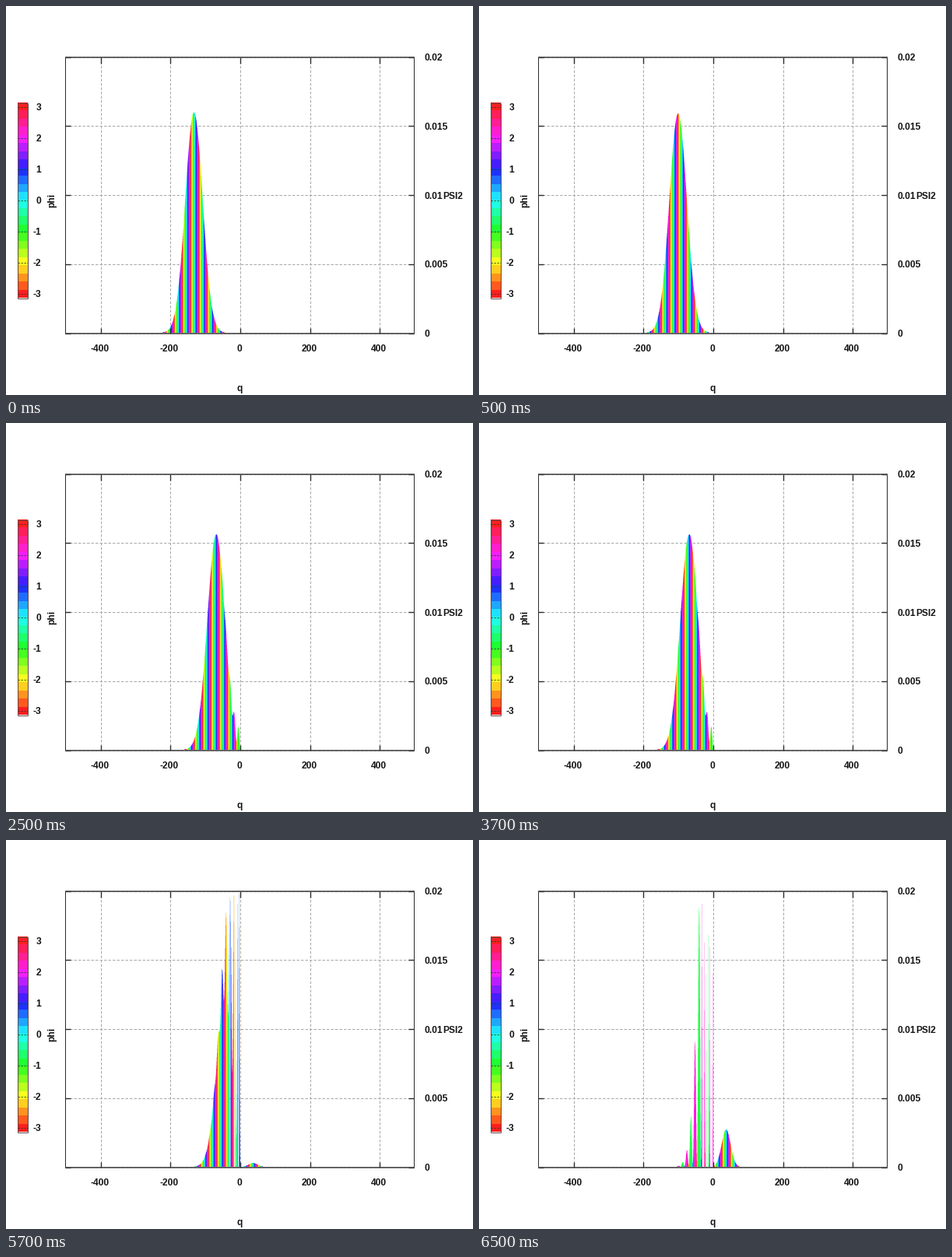
Write a matplotlib script that moves like this. It is 600 px wide and 500 px high and loops after 8 s.

```python
import numpy as np
import matplotlib.pyplot as plt
from matplotlib.animation import FuncAnimation
from matplotlib.colors import hsv_to_rgb

W, H, DPI = 600, 500, 100
PX = 72 / DPI
LEFT, RIGHT, TOP, BASE = 76, 524, 65.5, 420.5
INK = "#2b2b2b"

# Wave packet, measured in pixels
START, SPEED, SIGMA, PEAK = 241.5, 14.3, 11.2, 283.5
WAVELENGTH, WALL = 10.6, 301.2
X0, X1, Y0, Y1 = 190, 360, 66, 420
SUB = 4

fig = plt.figure(figsize=(W / DPI, H / DPI), dpi=DPI, facecolor="white")
ax = fig.add_axes([0, 0, 1, 1])


def line(x0, y0, x1, y1, color=INK, width=1.0, z=4, **kw):
    ax.plot([x0, x1], [y0, y1], color=color, lw=width * PX, zorder=z,
            solid_capstyle="butt", **kw)


def label(x, y, text, ha="center", va="center_baseline", **kw):
    ax.text(x, y, text, ha=ha, va=va, color="#161616",
            family="Liberation Sans", size=12 * PX, weight="bold", **kw)


def rgb(hue):
    hue = np.asarray(hue) % 1
    return hsv_to_rgb(np.stack([hue, 0 * hue + 0.88, 0 * hue + 1], -1))


def draw_axes():
    grid = dict(color="#a8a8a8", z=1, dashes=(3.5, 2))
    for q in range(-400, 401, 200):
        x = round(300 + q * 0.448) + 0.5
        line(x, BASE, x, TOP, **grid)
        line(x, BASE, x, BASE - 7, width=1.4)
        line(x, TOP, x, TOP + 8, width=1.4)
        label(x - 0.5, 440, str(q))
    for i, text in enumerate(["0", "0.005", "0.01", "0.015", "0.02"]):
        y = BASE - i * 88.75
        line(LEFT, y, RIGHT, y, **grid)
        line(LEFT, y, LEFT + 7, y, width=1.4)
        line(RIGHT, y, RIGHT - 7, y, width=1.4)
        label(538, y, text, "left")
    for x in (LEFT, RIGHT):
        line(x, TOP, x, BASE)
    for y in (TOP, BASE):
        line(LEFT - 0.5, y, RIGHT + 0.5, y, "#444444", 1.6)
    label(561, 243, "PSI2", "left")
    label(300, 490, "q")
    label(59, 250, "phi", va="center", rotation=90)


def draw_colorbar():
    bands = rgb(np.linspace(1, 0, 24))[:, None]
    ax.imshow(bands, extent=(15, 28, 375.5, 124.5), aspect="auto",
              interpolation="nearest", zorder=2)
    for x in (15, 28):
        line(x, 124.5, x, 375.5, "#604848")
    for y in (124.5, 375.5):
        line(15, y, 28, y, "#604848")
    for phi in range(-3, 4):
        y = 250 - 40 * phi
        line(15, y, 28, y, "#303030", 0.8, dashes=(3, 2))
        label(45, y, str(phi), "right")


def packet(x, step):
    """Complex amplitude of the free, slowly spreading packet."""
    center = START + SPEED * step
    spread = 1 + 0.012 * step ** 2
    density = PEAK / spread ** 0.5 * np.exp(
        -((x - center) / SIGMA) ** 2 / (2 * spread))
    turns = 0.4 + 0.62 * step + (x - center) / WAVELENGTH
    return np.sqrt(density) * np.exp(2j * np.pi * (turns - 0.5))


def wave_image(step):
    x = X0 + (np.arange((X1 - X0) * SUB) + 0.5) / SUB
    # The wall reflects the packet and lets a small hump leak through.
    psi = np.where(x < WALL, packet(x, step) - packet(2 * WALL - x, step), 0)
    leak = 48 * 10.0 ** (step - 4) * np.exp(-((x - 317.5) / 5.8) ** 2 / 2)
    psi = psi + np.sqrt(leak) * np.exp(2j * np.pi * (x - 317.5) / WAVELENGTH)

    height = np.abs(psi) ** 2
    height[height > Y1 - Y0] = 0  # values beyond the axis are not plotted
    rows = Y1 - np.arange(Y0, Y1) - 0.5
    mask = (rows[:, None] < height).astype(float)
    colors = rgb(0.5 + np.angle(psi) / (2 * np.pi))

    # Average the fine samples into whole pixels.
    shape = (Y1 - Y0, X1 - X0, SUB)
    alpha = mask.reshape(shape).mean(2)
    total = (mask[..., None] * colors).reshape(*shape, 3).mean(2)
    color = total / np.maximum(alpha, 1e-6)[..., None]
    return np.dstack([np.clip(color, 0, 1), alpha])


draw_axes()
draw_colorbar()
images = [wave_image(step) for step in range(5)]
wave = ax.imshow(images[0], extent=(X0, X1, Y1, Y0), aspect="auto",
                 interpolation="nearest", zorder=3)
ax.set(xlim=(0, W), ylim=(H, 0))
ax.axis("off")


def update(frame):
    wave.set_data(images[(frame + 3) // 4])
    return [wave]


anim = FuncAnimation(fig, update, frames=16, interval=500, repeat=True,
                     repeat_delay=0)
plt.show()
```
